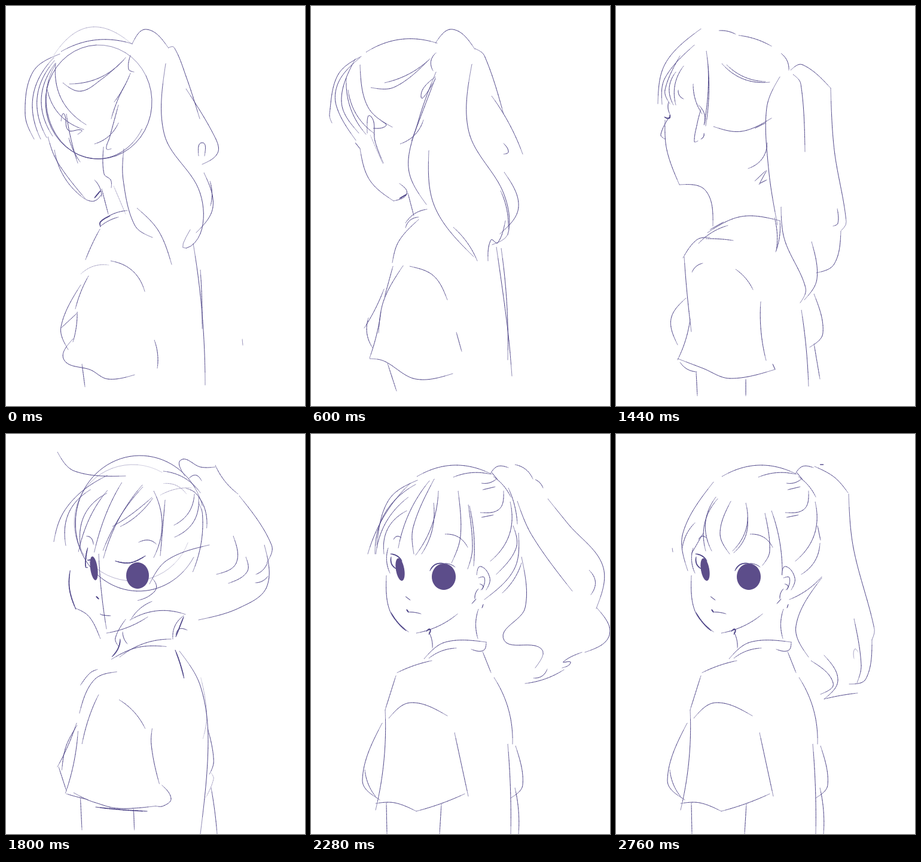
An HTML page with a canvas for the animation above (2.88 s loop, 500 by 667 pixels).

```html
<!DOCTYPE html>
<html lang="en">
<head>
<meta charset="utf-8">
<title>Head turn</title>
<style>
html, body { margin: 0; width: 100%; height: 100%; overflow: hidden; background: #fff; }
canvas { display: block; width: 100vw; height: 100vh; }
</style>
</head>
<body>
<canvas id="stage" width="500" height="667"></canvas>
<script>
const STEP = 120, STEPS = 24, N = 44, REACH = 48;
const INK = '#51488a', FILL = '#5c4d8a';
let sheet = [];

const add = (at, kind = '') => {
  const s = { kind, pts: Array.from({ length: N + 1 }, (_, k) => at(k / N)) };
  sheet.push(s);
  return s;
};
const faint = s => { s.kind = 'faint'; };
const bold = s => { s.kind = 'bold'; };

// One bend: bow is how far the middle leans to the right of travel.
function arc(x1, y1, x2, y2, bow = 0) {
  const dx = x2 - x1, dy = y2 - y1, L = Math.hypot(dx, dy);
  return add(u => {
    const h = 4 * bow * u * (1 - u) / L;
    return [x1 + dx * u - dy * h, y1 + dy * u + dx * h];
  });
}

// Several arcs spread evenly between two.
function fan(n, a, b) {
  for (let i = 0; i < n; i++) arc(...a.map((v, j) => v + (b[j] - v) * i / (n - 1)));
}

function oval(cx, cy, rx, ry, from = 0, to = 360, tilt = 0, kind) {
  const r = tilt * Math.PI / 180;
  return add(u => {
    const a = (from + (to - from) * u) * Math.PI / 180;
    const x = rx * Math.cos(a), y = ry * Math.sin(a);
    return [cx + x * Math.cos(r) - y * Math.sin(r), cy + x * Math.sin(r) + y * Math.cos(r)];
  }, kind);
}
const blob = (cx, cy, rx, ry, tilt) => oval(cx, cy, rx, ry, 0, 360, tilt, 'fill');

// Smooth curve through a few points.
function path(...n) {
  const p = [];
  for (let i = 0; i < n.length; i += 2) p.push([n[i], n[i + 1]]);
  const last = p.length - 1;
  const dist = (a, b) => Math.hypot(b[0] - a[0], b[1] - a[1]);
  const lens = p.slice(1).map((q, i) => dist(p[i], q));
  const total = lens.reduce((a, b) => a + b);
  const dirs = p.map((q, i) => {
    if (i > 0 && i < last) {
      const a = p[i - 1], b = p[i + 1], d = dist(a, b) || 1;
      return [(b[0] - a[0]) / d, (b[1] - a[1]) / d];
    }
  });
  // Ends continue the bend of their neighbour.
  const end = (i, j, L) => {
    const c = [(p[j][0] - p[i][0]) / L, (p[j][1] - p[i][1]) / L], d = dirs[j] || c;
    return [1.5 * c[0] - .5 * d[0], 1.5 * c[1] - .5 * d[1]];
  };
  const head = end(0, 1, lens[0]), tail = end(last, last - 1, -lens[last - 1]);
  dirs[0] = head;
  dirs[last] = tail;
  return add(t => {
    let s = t * total, i = 0;
    while (i < last - 1 && s > lens[i]) s -= lens[i++];
    const L = lens[i], u = Math.min(1, s / L), v = 1 - u;
    return [0, 1].map(j => v * v * (1 + 2 * u) * p[i][j] + u * u * (3 - 2 * u) * p[i + 1][j]
      + L * u * v * (v * dirs[i][j] - u * dirs[i + 1][j]));
  });
}

function bentHead() {
  oval(155, 160, 89, 95, -60, 300);
  oval(153, 155, 86, 100, 30, 215);
  faint(arc(80, 82, 211, 64, -38));
  arc(92, 76, 211, 63, -13);
  path(90, 80, 45, 110, 32, 180, 47, 222);
  fan(3, [80, 86, 58, 222, 24], [82, 96, 78, 217, 21]);
  arc(83, 95, 134, 198, 18);
  arc(68, 135, 130, 206, 14);
  path(92, 192, 97, 180, 104, 207, 126, 207, 120, 214);
  fan(2, [101, 180, 120, 262, 2], [105, 220, 124, 260, 2]);
  path(95, 128, 125, 142, 160, 122, 197, 90);
  arc(106, 130, 200, 86, 12);
  path(208, 82, 205, 105, 214, 110);
  fan(2, [208, 112, 181, 160, -2], [200, 130, 176, 188, 2]);
  path(188, 165, 173, 220, 168, 238, 176, 238);
  arc(148, 230, 188, 195, 6);
}

function bentFace() {
  path(163, 235, 164, 280, 175, 290, 176, 303);
  path(70, 218, 86, 260, 134, 323);
  arc(81, 240, 132, 322, 10);
  path(134, 323, 148, 325, 160, 314);
  bold(arc(148, 320, 158, 308));
  arc(148, 290, 160, 318, -3);
  arc(160, 305, 171, 347);
  faint(arc(180, 300, 200, 347));
  arc(158, 360, 203, 341, -4);
  arc(157, 368, 188, 352, -2);
  bold(path(158, 368, 158, 360, 174, 350));
}

function bentTail() {
  path(211, 63, 235, 39, 271, 69);
  path(271, 70, 281, 69, 302, 120, 324, 188);
  path(301, 138, 350, 220, 354, 245, 328, 264);
  path(322, 250, 328, 228, 332, 250);
  path(267, 96, 265, 215, 322, 305, 328, 370, 300, 404, 308, 373);
  path(331, 278, 346, 335, 318, 378);
  arc(341, 292, 342, 333, -3);
  path(197, 238, 196, 290, 215, 365, 245, 386);
  path(219, 337, 255, 375, 277, 431);
}

function bentBody() {
  arc(313, 396, 333, 632, -5);
  arc(325, 440, 328, 538, -1);
  arc(157, 372, 133, 423, 1);
  arc(175, 425, 232, 476, -12);
  arc(138, 450, 116, 505, 2);
  path(125, 465, 92, 535, 104, 573);
  arc(119, 510, 112, 560, -2);
  arc(119, 512, 92, 537);
  path(112, 555, 97, 590, 142, 607, 170, 622, 215, 615);
  arc(248, 557, 253, 604, -3);
  arc(127, 597, 132, 635);
  faint(arc(395, 555, 396, 566));
  faint(arc(125, 447, 172, 432, -6));
}

function liftHead() {
  arc(92, 77, 211, 62, -14);
  path(84, 84, 45, 115, 31, 180, 35, 195);
  path(82, 86, 47, 125, 42, 165, 75, 224);
  arc(59, 120, 92, 214, 10);
  path(74, 88, 51, 160, 80, 212);
  path(82, 98, 95, 168, 136, 202);
  arc(62, 140, 105, 212, 9);
  path(100, 136, 140, 135, 197, 90);
  arc(123, 128, 199, 88, 6);
  path(94, 212, 100, 184, 107, 225, 121, 262);
  faint(arc(99, 215, 120, 263));
  path(104, 204, 125, 200, 118, 192);
}

function liftFace() {
  path(208, 118, 184, 150, 208, 122);
  path(209, 110, 180, 190, 163, 270, 193, 331);
  arc(208, 120, 168, 225);
  arc(149, 230, 188, 190, 7);
  arc(209, 78, 204, 108, 6);
  arc(74, 228, 82, 238);
  path(82, 238, 98, 290, 138, 325);
  path(138, 325, 160, 313, 148, 296);
  bold(arc(148, 321, 160, 314));
  arc(162, 312, 172, 350);
  arc(158, 362, 194, 339, -5);
  arc(158, 370, 180, 352, -5);
}

function liftTail() {
  path(208, 62, 237, 39, 274, 72);
  path(274, 71, 290, 83, 322, 180);
  arc(302, 150, 354, 247, -4);
  path(322, 247, 330, 243, 322, 229);
  path(269, 97, 264, 210, 322, 312, 330, 378, 303, 398);
  path(323, 277, 347, 335, 316, 380);
  arc(317, 308, 330, 372, -4);
  path(197, 241, 207, 335, 272, 418);
  arc(238, 369, 278, 425, -4);
  path(325, 358, 312, 395, 301, 390, 296, 425);
}

function liftBody() {
  path(180, 356, 147, 392, 136, 428);
  path(165, 434, 205, 450, 228, 490);
  path(154, 433, 122, 490, 113, 545);
  arc(137, 434, 123, 485);
  arc(122, 472, 89, 537, -2);
  arc(96, 520, 103, 570, 6);
  arc(117, 510, 98, 587, -2);
  path(98, 588, 122, 592, 175, 622, 237, 613);
  path(310, 402, 329, 540, 336, 617);
  arc(318, 404, 329, 590, -4);
  arc(243, 544, 252, 576);
  arc(128, 596, 143, 642);
}

function swingHead() {
  faint(path(82, 100, 130, 46, 210, 40, 237, 55));
  arc(163, 44, 272, 100, -16);
  path(150, 42, 88, 110, 105, 205, 210, 232);
  faint(arc(58, 100, 150, 40, -24));
  path(101, 72, 55, 112, 40, 145);
  arc(130, 45, 45, 125, -4);
  path(118, 58, 70, 115, 78, 166);
  fan(4, [122, 60, 84, 160, 20], [150, 55, 139, 175, 12]);
  arc(128, 85, 133, 173, 4);
  path(157, 88, 185, 122, 253, 125);
  arc(180, 120, 253, 125, 1);
  path(121, 241, 122, 185, 131, 212, 124, 240);
  path(140, 184, 165, 210, 210, 212);
  path(88, 175, 130, 213, 209, 219);
  path(124, 176, 138, 175, 141, 172);
  faint(arc(215, 50, 247, 125, -5));
}

function swingFace() {
  path(81, 168, 78, 235, 106, 312);
  bold(path(77, 195, 84, 193, 82, 198));
  arc(84, 193, 74, 220);
  path(106, 313, 140, 314, 153, 311);
  bold(arc(110, 312, 154, 315, 1));
  path(140, 298, 160, 315, 168, 345);
  arc(163, 318, 160, 362, -4);
  arc(143, 385, 203, 347, -6);
  fan(2, [158, 366, 185, 346, 0], [154, 370, 182, 350, 0]);
}

function swingTail() {
  path(262, 150, 263, 125, 278, 114);
  path(272, 100, 304, 95, 339, 152);
  path(336, 115, 350, 185, 405, 285, 390, 317);
  arc(343, 152, 370, 236, 2);
  path(342, 195, 368, 240, 372, 288, 388, 278, 371, 262);
  path(382, 321, 411, 365, 380, 402, 396, 397);
  path(388, 402, 357, 415, 371, 468);
  path(310, 175, 294, 215, 356, 276);
  path(263, 151, 215, 195, 183, 278, 203, 280);
  path(203, 280, 211, 298, 214, 322, 218, 335);
  path(218, 335, 265, 342, 310, 328);
  faint(arc(310, 328, 331, 385, -14));
  arc(277, 341, 300, 378, -2);
  bold(arc(265, 340, 285, 347));
  path(318, 420, 338, 398, 330, 383);
  arc(365, 402, 320, 418, -2);
  fan(2, [326, 418, 352, 482, -3], [345, 410, 354, 480, -2]);
  path(340, 485, 365, 515, 317, 541);
}

function swingBody() {
  path(190, 383, 150, 385, 120, 445, 122, 518);
  faint(arc(196, 377, 228, 388, -3));
  faint(arc(140, 437, 148, 435, -2));
  path(179, 434, 205, 455, 200, 440, 212, 436);
  path(212, 436, 258, 520, 272, 592, 248, 546);
  path(124, 515, 82, 563, 132, 582, 190, 555, 248, 546);
  arc(124, 458, 90, 540, 8);
  arc(82, 562, 107, 583);
  arc(113, 580, 109, 613);
  arc(222, 547, 213, 605, 2);
  path(304, 375, 324, 470, 317, 540, 330, 622);
  arc(337, 527, 344, 565);
}

function sideHead() {
  path(142, 38, 83, 95, 70, 163);
  arc(172, 41, 200, 47, -2);
  arc(205, 49, 260, 67, -3);
  arc(276, 79, 289, 107, -4);
  path(131, 65, 82, 120, 77, 164);
  path(107, 83, 82, 140, 90, 163);
  fan(2, [100, 110, 96, 165, 9], [113, 100, 100, 165, 8]);
  arc(104, 140, 113, 155, 3);
  arc(129, 130, 144, 180, 4);
  arc(151, 75, 150, 200, -5);
  arc(138, 165, 148, 198, -5);
  arc(154, 100, 147, 198, -3);
  path(142, 172, 136, 195, 131, 226, 137, 225);
  arc(147, 212, 142, 222, -2);
  fan(2, [177, 96, 257, 127, 11], [185, 98, 250, 126, 7]);
  path(163, 201, 210, 209, 260, 187);
  arc(232, 204, 250, 195);
}

function sideFace() {
  bold(path(81, 185, 89, 187, 90, 181));
  arc(88, 160, 90, 180, 2);
  path(91, 182, 75, 214, 82, 222);
  path(82, 190, 85, 240, 106, 298);
  path(106, 298, 150, 308, 162, 367);
  arc(253, 228, 221, 271, -9);
  fan(2, [239, 298, 252, 274, 0], [232, 292, 250, 275, 0]);
  arc(240, 296, 252, 290);
  path(153, 378, 210, 351, 274, 358);
  arc(138, 396, 187, 366, -4);
  arc(157, 373, 180, 360);
}

function sideTail() {
  path(292, 107, 312, 98, 359, 137);
  path(359, 137, 365, 240, 385, 360, 377, 374);
  path(376, 375, 365, 430, 335, 445);
  path(370, 338, 371, 362, 363, 367);
  path(296, 114, 309, 130, 316, 243);
  path(274, 118, 252, 170, 255, 270, 270, 365);
  path(276, 335, 282, 390, 317, 470, 308, 495);
  path(327, 393, 336, 455, 315, 490);
  arc(274, 358, 267, 410, -3);
  arc(265, 353, 268, 408, -3);
}

function sideBody() {
  path(157, 386, 135, 390, 112, 420);
  arc(150, 388, 196, 391, -1);
  arc(114, 418, 126, 543, 1);
  arc(127, 444, 145, 429, -3);
  arc(200, 439, 229, 473, -3);
  arc(242, 493, 251, 591, 4);
  path(117, 487, 92, 522, 103, 565);
  arc(124, 522, 103, 590, -3);
  path(103, 588, 145, 604, 190, 621, 266, 606);
  arc(266, 606, 262, 597);
  arc(107, 594, 135, 610, 4);
  arc(134, 610, 136, 650);
  arc(217, 622, 217, 650);
  arc(310, 507, 322, 634, -2);
  path(331, 480, 346, 545, 324, 569);
  arc(331, 563, 341, 622);
}

function roughHead() {
  path(86, 30, 115, 62, 200, 70);
  oval(224, 149, 108, 113, 160, 345);
  oval(222, 149, 106, 113, 30, 200);
  faint(oval(212, 148, 98, 97, 20, 300));
  arc(195, 72, 82, 190, 22);
  arc(160, 88, 100, 200, 24);
  arc(195, 78, 113, 203, 30);
  arc(180, 90, 104, 195, 14);
  fan(4, [222, 85, 146, 195, 12], [242, 95, 195, 192, -6]);
  arc(228, 85, 163, 207, 8);
  arc(247, 95, 247, 206, -14);
  arc(266, 110, 258, 203);
  arc(263, 62, 325, 98, -8);
  faint(arc(255, 85, 310, 95, -8));
  faint(arc(258, 102, 310, 90, -4));
  fan(2, [315, 100, 281, 152, -9], [322, 105, 282, 172, -14]);
  arc(308, 80, 320, 170, -16);
  arc(340, 117, 310, 221, -12);
  path(340, 185, 270, 210, 240, 250);
  path(240, 250, 253, 263, 240, 276, 220, 282);
}

function roughFace() {
  arc(132, 174, 145, 175, -5);
  arc(215, 165, 252, 176, -9);
  bold(arc(133, 202, 136, 221, 2));
  bold(arc(133, 203, 150, 212, -3));
  blob(147, 224, 6, 20, -8);
  bold(arc(196, 219, 215, 214, 2));
  blob(220, 236, 19, 22);
  bold(arc(151, 271, 155, 275));
  path(157, 300, 162, 302, 175, 303);
  arc(155, 200, 168, 325, 2);
  bold(arc(124, 253, 124, 288, 4));
  arc(122, 285, 155, 324, 4);
  arc(168, 332, 237, 305, 4);
  arc(240, 282, 195, 318, 6);
  arc(195, 330, 203, 350, 2);
  path(200, 309, 183, 340, 188, 354);
  arc(297, 303, 279, 342, 6);
  bold(arc(284, 338, 297, 305));
  path(284, 335, 290, 325, 303, 327);
  fan(2, [190, 372, 276, 342, -8], [192, 374, 264, 352, -4]);
  bold(arc(198, 330, 191, 370, -6));
}

function roughTail() {
  path(299, 70, 293, 43, 325, 55, 350, 55);
  arc(350, 52, 388, 100, 4);
  path(390, 103, 444, 185, 436, 215);
  path(432, 185, 436, 255, 390, 290, 322, 310);
  path(380, 170, 385, 215, 352, 234);
  path(401, 205, 403, 230, 372, 249);
  fan(2, [437, 215, 418, 234, -3], [438, 237, 417, 248, -3]);
  arc(185, 320, 332, 308, -18);
  arc(305, 75, 327, 78, -8);
}

function roughBody() {
  path(212, 375, 155, 395, 120, 480);
  arc(133, 418, 150, 397);
  arc(128, 499, 182, 446, -5);
  arc(182, 446, 235, 503, -6);
  arc(118, 478, 97, 605, -4);
  fan(2, [118, 482, 86, 555, -2], [120, 485, 87, 557, -2]);
  arc(88, 555, 101, 595);
  arc(97, 604, 137, 609, -2);
  path(120, 605, 150, 621, 240, 630);
  bold(arc(150, 622, 236, 629, 1));
  path(240, 630, 262, 631, 284, 613, 260, 578);
  path(246, 490, 244, 515, 260, 578);
  arc(118, 604, 121, 667);
  arc(211, 628, 213, 667);
  path(290, 362, 325, 420, 338, 510, 325, 667);
  bold(arc(289, 362, 318, 405));
  faint(arc(325, 415, 339, 520, -2));
  arc(342, 500, 351, 566);
  faint(path(351, 566, 356, 575, 330, 595));
  arc(343, 590, 353, 667, -1);
}

function frontFace() {
  arc(129, 190, 132, 232, 4);
  path(126, 236, 132, 295, 163, 330);
  bold(arc(134, 298, 159, 328, 2));
  arc(176, 332, 245, 300, 5);
  bold(path(193, 329, 199, 326, 197, 334));
  arc(197, 330, 203, 357, -2);
  arc(280, 292, 279, 341, 4);
  arc(288, 284, 286, 290);
  arc(158, 271, 166, 277);
  bold(arc(160, 293, 163, 297));
  arc(163, 297, 184, 300, -1);
  arc(138, 176, 151, 173, -4);
  arc(224, 167, 262, 189, -7);
  bold(arc(134, 205, 143, 225, 4));
  bold(arc(133, 200, 152, 212, -3));
  blob(149, 226, 7, 19, -10);
  bold(arc(199, 228, 222, 216, -5));
  arc(222, 216, 241, 222, -2);
  blob(222, 238, 20, 22);
  path(277, 235, 284, 221, 299, 240, 293, 260);
  path(280, 240, 290, 240, 286, 260);
  arc(282, 250, 284, 260, -5);
  arc(280, 258, 274, 275, 2);
  arc(276, 275, 269, 283);
}

function frontBody() {
  path(189, 375, 225, 347, 293, 347);
  path(293, 347, 288, 361, 268, 359);
  arc(197, 374, 243, 357, -4);
  arc(202, 378, 144, 398, 2);
  arc(142, 403, 124, 460);
  path(130, 474, 167, 448, 228, 470);
  arc(124, 460, 108, 627, -6);
  path(119, 482, 86, 577, 115, 610);
  arc(90, 560, 110, 607, 4);
  path(108, 616, 140, 615, 176, 629);
  arc(176, 629, 257, 600, 2);
  arc(240, 498, 263, 604);
  arc(287, 363, 301, 398);
  arc(306, 406, 337, 517, -9);
  arc(329, 517, 334, 667, -2);
  path(342, 520, 354, 585, 334, 607);
  arc(341, 590, 347, 667, -3);
  arc(126, 615, 127, 667);
  arc(218, 617, 215, 667);
}

function frontHair() {
  arc(177, 71, 302, 67, -17);
  arc(238, 72, 300, 67, -5);
  arc(285, 82, 310, 75, 3);
  arc(287, 93, 308, 88);
  path(283, 131, 315, 125, 322, 95);
  arc(285, 139, 305, 135);
  arc(305, 71, 334, 105, -3);
  arc(333, 113, 300, 212, -16);
  path(300, 66, 312, 54, 330, 56);
  arc(302, 64, 312, 76);
}

function blownHair() {
  path(178, 77, 130, 110, 110, 185);
  fan(3, [165, 83, 95, 200, 9], [160, 128, 122, 200, 14]);
  arc(175, 84, 107, 200, 20);
  path(206, 75, 171, 155, 172, 200);
  arc(213, 95, 175, 202, -9);
  arc(205, 115, 185, 200, -8);
  arc(198, 78, 146, 190, 8);
  path(246, 95, 250, 170, 235, 215);
  path(263, 118, 270, 190, 262, 225);
  arc(265, 120, 272, 220, -4);
  arc(330, 90, 345, 150, -3);
  path(338, 153, 343, 190, 310, 234);
  path(347, 165, 340, 225, 290, 276);
  arc(352, 215, 320, 265, -4);
}

function blownTail() {
  arc(341, 51, 371, 75, -5);
  arc(375, 76, 388, 90, -2);
  path(396, 108, 430, 150, 488, 220, 477, 291);
  path(478, 290, 499, 335, 458, 364);
  path(453, 364, 422, 380, 434, 381, 420, 390);
  arc(423, 393, 358, 416, -4);
  arc(465, 227, 468, 268, -9);
  path(345, 112, 370, 170, 437, 262);
  path(352, 205, 358, 290, 322, 342, 385, 358, 375, 390);
  arc(372, 407, 395, 392, 5);
}

function calmHair() {
  path(163, 80, 112, 165, 120, 228);
  fan(2, [170, 108, 150, 195, 12], [167, 105, 160, 195, 14]);
  path(192, 112, 174, 165, 190, 200);
  fan(2, [217, 115, 195, 195, -12], [220, 140, 197, 198, -8]);
  path(249, 132, 257, 195, 245, 219);
  arc(260, 128, 278, 235, -5);
  arc(146, 165, 126, 200);
  arc(132, 148, 111, 190, 4);
  faint(arc(94, 190, 95, 197));
  arc(337, 153, 342, 177);
  arc(341, 182, 310, 234, -8);
  arc(344, 238, 290, 276, -4);
}

function calmTail() {
  arc(341, 51, 347, 51);
  path(332, 54, 365, 72, 388, 98);
  path(389, 100, 397, 190, 432, 325, 428, 343);
  path(428, 343, 418, 408, 390, 417);
  arc(404, 432, 348, 442, 1);
  path(348, 442, 371, 410, 348, 369);
  path(344, 240, 301, 320, 322, 372);
  path(326, 378, 363, 415, 342, 434);
  path(398, 308, 410, 385, 403, 415);
  faint(path(398, 375, 399, 359, 405, 364));
}

const poses = [
  { at: 0, parts: [bentHead, bentFace, bentTail, bentBody] },
  { at: 5, parts: [liftHead, liftFace, liftTail, liftBody] },
  { at: 8, parts: [swingHead, swingFace, swingTail, swingBody] },
  { at: 12, parts: [sideHead, sideFace, sideTail, sideBody] },
  { at: 17, parts: [roughHead, roughFace, roughTail, roughBody] },
  { at: 19, parts: [frontFace, frontBody, frontHair, blownHair, blownTail] },
  { at: 23, parts: [frontFace, frontBody, frontHair, calmHair, calmTail] }
];
for (const pose of poses) {
  sheet = pose.strokes = [];
  pose.parts.forEach(draw => draw());
}

function gap(a, b) {
  let sum = 0;
  for (let k = 0; k <= N; k += N / 4) sum += Math.hypot(a[k][0] - b[k][0], a[k][1] - b[k][1]);
  return sum / 5;
}

// Pair up nearby strokes of two poses, closest first.
function pair(A, B) {
  const all = [], usedA = new Set(), usedB = new Set(), links = [];
  for (const a of A) for (const b of B) {
    if ((a.kind === 'fill') !== (b.kind === 'fill')) continue;
    const back = [...b.pts].reverse();
    const f = gap(a.pts, b.pts), r = gap(a.pts, back);
    all.push({ a, b, cost: Math.min(f, r), end: r < f ? back : b.pts });
  }
  all.sort((x, y) => x.cost - y.cost);
  for (const l of all) {
    if (l.cost > REACH || usedA.has(l.a) || usedB.has(l.b)) continue;
    usedA.add(l.a);
    usedB.add(l.b);
    links.push(l);
  }
  return { links, gone: A.filter(a => !usedA.has(a)), fresh: B.filter(b => !usedB.has(b)) };
}
const spans = poses.slice(1).map((p, i) => pair(poses[i].strokes, p.strokes));

function strokesAt(step) {
  const exact = poses.find(p => p.at === step);
  if (exact) return exact.strokes;
  const i = poses.findIndex(p => p.at > step) - 1;
  const t = (step - poses[i].at) / (poses[i + 1].at - poses[i].at);
  const { links, gone, fresh } = spans[i];
  return links.map(({ a, b, end }) => ({
    kind: t < .5 ? a.kind : b.kind,
    pts: a.pts.map((p, k) => [p[0] + (end[k][0] - p[0]) * t, p[1] + (end[k][1] - p[1]) * t])
  })).concat(t < .5 ? gone : fresh);
}

const ctx = document.getElementById('stage').getContext('2d');
ctx.lineCap = ctx.lineJoin = 'round';

function ink({ pts, kind }) {
  ctx.globalAlpha = kind === 'faint' ? .4 : 1;
  if (kind === 'fill') {
    ctx.fillStyle = FILL;
    ctx.beginPath();
    pts.forEach(p => ctx.lineTo(...p));
    ctx.fill();
    return;
  }
  ctx.strokeStyle = INK;
  const full = kind === 'bold' ? 1.7 : 1;
  for (let k = 0; k < N; k += 4) {
    ctx.lineWidth = full * (.5 + .5 * Math.min(1, 2 * Math.sin(Math.PI * (k + 2) / N)));
    ctx.beginPath();
    for (let j = k; j <= k + 4; j++) ctx.lineTo(...pts[j]);
    ctx.stroke();
  }
}

const t0 = performance.now();
let shown = -1;
function tick() {
  const step = Math.floor((performance.now() - t0) / STEP) % STEPS;
  if (step !== shown) {
    shown = step;
    ctx.globalAlpha = 1;
    ctx.fillStyle = '#fff';
    ctx.fillRect(0, 0, 500, 667);
    strokesAt(step).forEach(ink);
  }
  requestAnimationFrame(tick);
}
tick();
</script>
</body>
</html>
```
